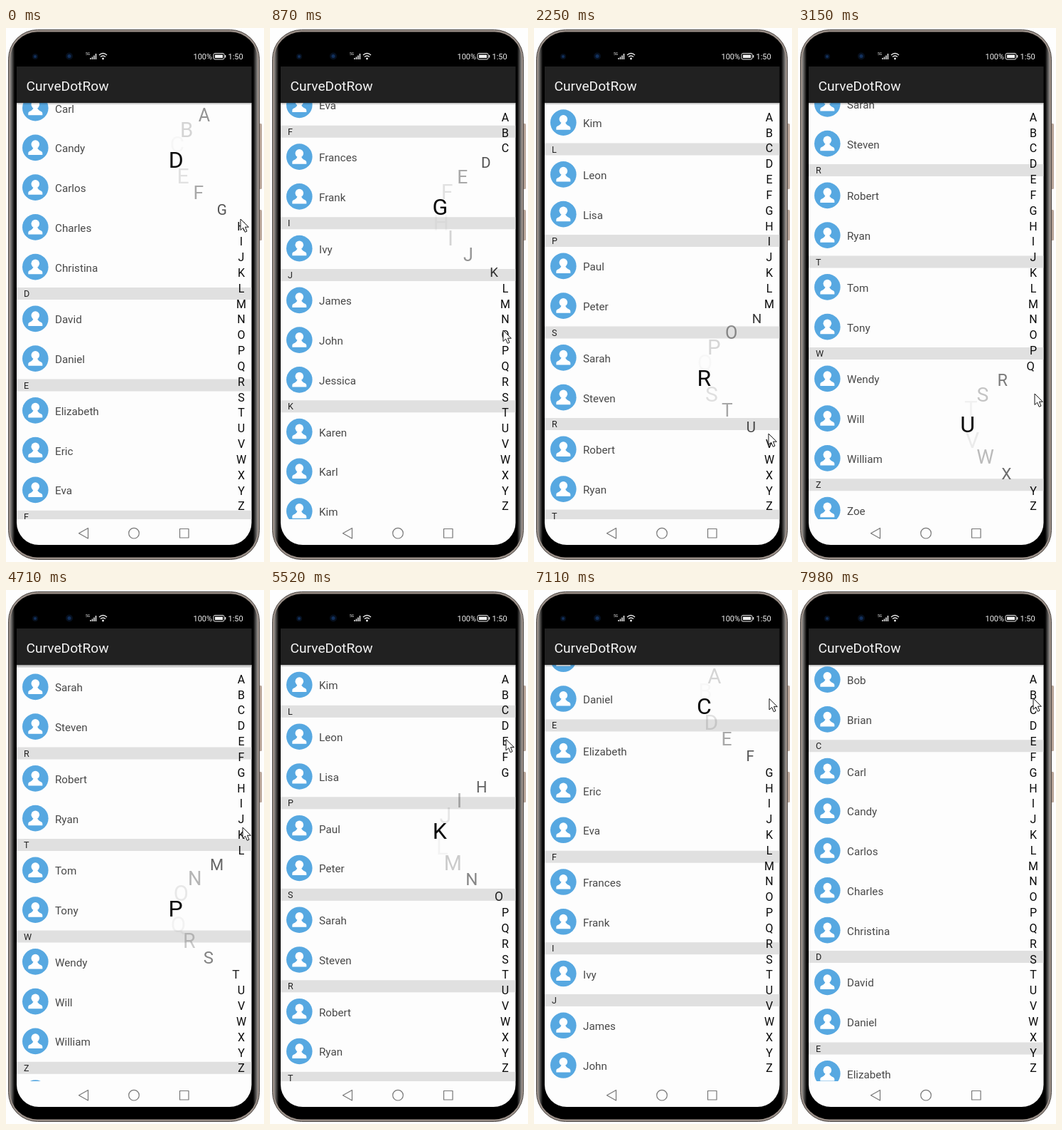
Animation of 363x749 px, one loop 8 s. Source, as an HTML page:

```html
<!DOCTYPE html>
<html lang="en">
<head>
<meta charset="utf-8">
<title>Letter index</title>
<style>
  html, body { margin: 0; width: 100%; height: 100%; overflow: hidden; background: #fefefe; }
  svg { display: block; width: 363px; height: 749px; font-family: Roboto, "Open Sans", sans-serif; }
  .status { font-size: 11px; fill: #eee; }
  .title { font-size: 19.2px; fill: #f4f4f4; }
  .name { font-size: 15.2px; fill: #484848; }
  .head { font-size: 12.5px; fill: #222; }
  .letters { text-anchor: middle; fill: #0a0a0a; }
  .nav { fill: none; stroke: #777; stroke-width: 1.2; stroke-linejoin: round; }
</style>
</head>
<body>
<svg viewBox="0 0 363 749">
  <defs>
    <linearGradient id="edge">
      <stop offset="0" stop-color="#8c8a88"/>
      <stop offset=".018" stop-color="#000"/>
      <stop offset=".982" stop-color="#000"/>
      <stop offset="1" stop-color="#8c8a88"/>
    </linearGradient>
    <linearGradient id="shade" x2="0" y2="1">
      <stop offset="0" stop-color="#000" stop-opacity=".3"/>
      <stop offset="1" stop-color="#000" stop-opacity="0"/>
    </linearGradient>
    <clipPath id="view"><rect x="15" y="105" width="330.5" height="584"/></clipPath>
    <g id="person">
      <circle r="18.3" fill="#57a8e1"/>
      <circle cy="-4.8" r="5.8" fill="#fff"/>
      <path d="M-10 10V7.5C-10 4-4 4.500-3 0H3C4 4.500 10 4 10 7.500V10Z" fill="#fff"/>
    </g>
  </defs>

  <!-- phone body -->
  <g fill="#b9a598">
    <rect x="355" y="134" width="5" height="92" rx="1.500"/>
    <rect x="355" y="255" width="5" height="43" rx="1.500"/>
  </g>
  <rect x="3.500" y="2.500" width="353" height="743" rx="41" fill="#9a8f88" stroke="#4a4542"/>
  <rect x="6" y="5.500" width="348" height="737" rx="38" fill="url(#edge)"/>
  <path d="M15 54H345.500V106H15Z" fill="#212121"/>
  <path d="M15 105H345.500V694A31 31 0 0 1 314.500 725H46A31 31 0 0 1 15 694Z" fill="#fdfdfd"/>

  <!-- status bar -->
  <circle cx="41" cy="40" r="4" fill="#06101f"/>
  <circle cx="41" cy="40" r="2" fill="#12305c"/>
  <circle cx="89" cy="39.500" r="5" fill="#06101f"/>
  <circle cx="89" cy="39.500" r="2.500" fill="#12305c"/>
  <text x="112" y="38" font-size="5" fill="#eee">5G</text>
  <path d="M119 44V42M121.500 44V40.500M124 44V38.500M126.500 44V36" stroke="#eee" stroke-width="1.500"/>
  <g fill="none" stroke="#eee" stroke-width="1.400">
    <path d="M131 38Q136.500 33 142 38M133 40.500Q136.500 37.500 140 40.500"/>
    <circle cx="136.500" cy="43" r=".7"/>
    <rect x="292" y="35.500" width="15" height="8.500" rx="2" stroke-width="1"/>
  </g>
  <path d="M294 37.500H305V42H294ZM308 38H309.300V41.500H308Z" fill="#eee"/>
  <text class="status" x="263.500" y="43.800">100%</text>
  <text class="status" x="312.500" y="43.800">1:50</text>
  <text class="title" x="28.500" y="88">CurveDotRow</text>

  <g clip-path="url(#view)"><g id="list"></g></g>
  <rect x="15" y="105" width="330.500" height="3" fill="url(#shade)"/>

  <g class="nav">
    <path d="M115.500 701.500V716L102.500 708.700Z"/>
    <circle cx="180" cy="708.700" r="7.300"/>
    <rect x="244.500" y="702.500" width="12.500" height="12.500"/>
  </g>

  <g id="letters" class="letters"></g>
  <path id="cursor" d="M0 0V15.500L3.700 12.200L6.300 18.300L9 17.100L6.500 11.200H11.400Z" fill="#fff" stroke="#111"/>
</svg>

<script>
const LOOP = 8000, TOP = 105, ROW = 55.75, HEAD = 17;
const PITCH = 21.83, BASE = 130.7, SIZE = 16, BAR_X = 331, REACH = 92.5;
const RELEASE = 7480;

const groups = {
  A: "Abbey Alex Amy Anne", B: "Betty Bob Brian",
  C: "Carl Candy Carlos Charles Christina", D: "David Daniel",
  E: "Elizabeth Eric Eva", F: "Frances Frank", I: "Ivy",
  J: "James John Jessica", K: "Karen Karl Kim", L: "Leon Lisa",
  P: "Paul Peter", S: "Sarah Steven", R: "Robert Ryan", T: "Tom Tony",
  W: "Wendy Will William", Z: "Zoe"
};

const byId = id => document.getElementById(id);

function add(parent, tag, attrs, text) {
  const el = document.createElementNS(parent.namespaceURI, tag);
  for (const key in attrs) el.setAttribute(key, attrs[key]);
  if (text) el.textContent = text;
  return parent.appendChild(el);
}

// Smooth curve through [time, value] points without overshoot
function curve(points) {
  const slopes = points.slice(1).map(([t, v], i) => (v - points[i][1]) / (t - points[i][0]));
  const tangents = points.map((_, i) => {
    const a = slopes[i - 1] ?? slopes[i], b = slopes[i] ?? a;
    return a * b <= 0 ? 0 : 2 * a * b / (a + b);
  });
  return t => {
    let i = 0;
    while (i < points.length - 2 && t >= points[i + 1][0]) i++;
    const [t0, v0] = points[i], [t1, v1] = points[i + 1];
    const span = t1 - t0, u = Math.min(1, (t - t0) / span), w = 1 - u;
    return v0 * (1 + 2 * u) * w * w + tangents[i] * span * u * w * w
         + v1 * u * u * (3 - 2 * u) - tangents[i + 1] * span * u * u * w;
  };
}

const scrollAt = curve([[0, 461], [870, 1001], [2250, 1546], [3150, 1902], [3500, 1918],
  [4350, 1918], [4710, 1872.5], [6350, 1081], [7980, 319]]);
const waveAt = curve([[0, 2.64], [870, 6.36], [1780, 13.7], [2250, 16.6], [3150, 19.92], [3500, 20.4],
  [4050, 17.8], [4710, 15.17], [5610, 9.5], [6350, 4.13], [7250, 1.3], [7980, 1.2]]);
const cursorY = curve([[0, 268], [870, 424], [1350, 487], [2250, 569], [2600, 573], [3150, 513],
  [3810, 456], [4710, 333], [5450, 215], [6350, 153], [7980, 152]]);
const cursorX = curve([[0, 330], [870, 328], [2250, 330], [3150, 333], [4710, 333], [6350, 331], [7980, 331]]);

// The picture is held between steps: [start, number of steps to the next start]
const beats = [[0, 1], [150, 5], [870, 2], [1140, 1], [1290, 7], [2250, 1], [2370, 6], [3150, 2],
  [3390, 1], [3540, 8], [4580, 1], [4710, 7], [5640, 1], [5780, 4], [6350, 3], [6750, 1],
  [6870, 7], [7830, 1], [7980, 1]];
const steps = beats.flatMap(([start, count], i) => {
  const end = beats[i + 1]?.[0] ?? LOOP;
  return Array.from({ length: count }, (_, k) => start + (end - start) * k / count);
});

const list = byId("list"), cursor = byId("cursor");
let y = TOP;
for (const letter in groups) {
  add(list, "rect", { x: 15, y, width: 330.5, height: HEAD, fill: "#e0e0e0" });
  add(list, "text", { class: "head", x: 25, y: y + 13 }, letter);
  y += HEAD;
  for (const name of groups[letter].split(" ")) {
    const mid = y + ROW / 2;
    add(list, "use", { href: "#person", x: 41.3, y: mid - 1 });
    add(list, "text", { class: "name", x: 69, y: mid + 5.5 }, name);
    y += ROW;
  }
}

const letters = Array.from({ length: 26 }, (_, i) =>
  add(byId("letters"), "text", { y: BASE + PITCH * i }, String.fromCharCode(65 + i)));

function draw(t) {
  list.setAttribute("transform", `translate(0 ${-scrollAt(t)})`);
  cursor.setAttribute("transform", `translate(${cursorX(t)} ${cursorY(t)})`);
  const wave = waveAt(t), held = t < RELEASE;
  letters.forEach((el, i) => {
    const scale = held ? Math.max(0, 1 - (wave - i) ** 2 / 16) : 0;
    el.setAttribute("x", BAR_X - REACH * scale);
    el.setAttribute("font-size", SIZE * (1 + scale));
    el.setAttribute("fill-opacity", i === Math.round(wave) ? 1 : 1 - scale);
  });
}

const begin = performance.now();
function tick() {
  const t = (performance.now() - begin) % LOOP;
  draw(steps.findLast(s => s <= t));
  requestAnimationFrame(tick);
}
draw(0);
requestAnimationFrame(tick);
</script>
</body>
</html>
```
